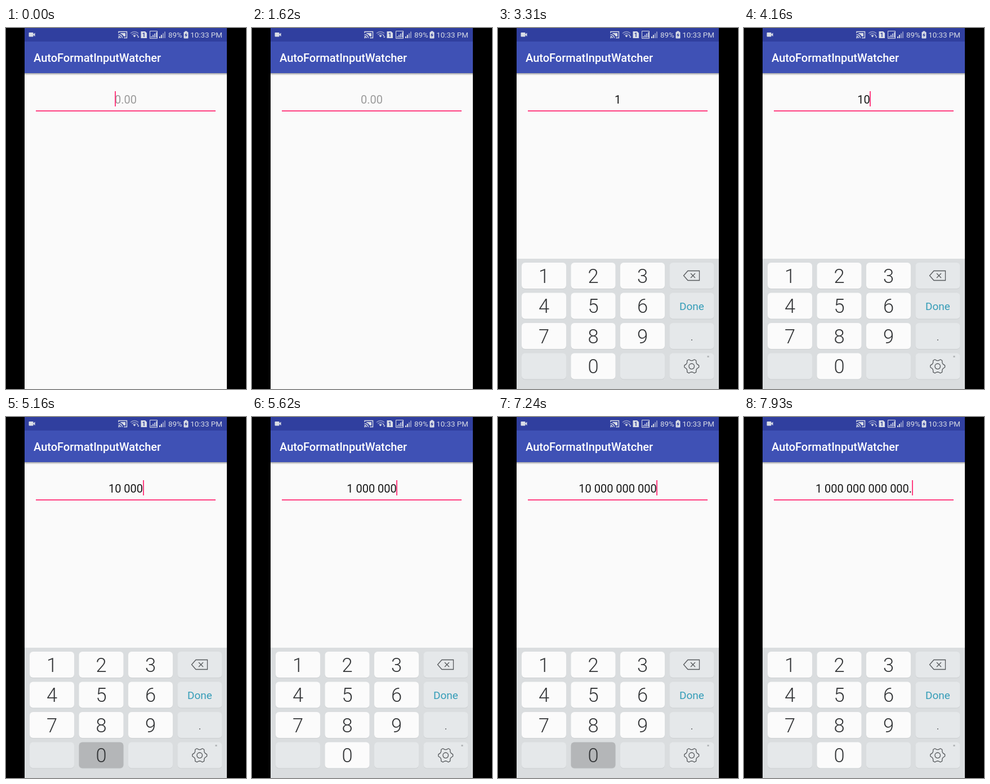
These frames come from a looping animation (426 by 640 pixels, 8 s). An HTML page with a canvas:

```html
<!DOCTYPE html>
<html lang="en">
<head>
<meta charset="utf-8">
<title>AutoFormatInputWatcher</title>
<style>
  html, body { margin: 0; width: 100%; height: 100%; overflow: hidden; background: #000; }
  canvas { display: block; }
</style>
</head>
<body>
<canvas id="stage" width="426" height="640"></canvas>
<script>
const ctx = document.getElementById('stage').getContext('2d');
const LOOP = 8000;
const LEFT = 33, WIDTH = 359, CENTER = 212.5;
const LABELS = ['1', '2', '3', 'back', '4', '5', '6', 'Done', '7', '8', '9', '.', '', '0', '', 'gear'];
const COLOR = {
  page: '#fafafa', bar: '#3f51b5', status: '#303f9f', icon: '#d9dde6', accent: '#ff4081',
  board: '#dadddf', key: '#fbfbfb', side: '#e5e8ea', pressed: '#b4b6b8', ink: '#333537', line: '#56595c'
};

// key, pressed, character shown, released (ms); zeros come in groups of three
const STROKES = [
  ['1', 3080, 3230, 3310],
  ['0', 3770, 3930, 4000],
  ['0', 4240, 4310, 4310],
  ['0', 4390, 4470, 4540],
  ['0', 5010, 5080, 5240],
  ['0', 5310, 5390, 5390],
  ['0', 5460, 5540, 5620],
  ['0', 6010, 6080, 6160],
  ['0', 6240, 6310, 6310],
  ['0', 6390, 6470, 6550],
  ['0', 6930, 7080, 7160],
  ['0', 7240, 7310, 7390],
  ['0', 7470, 7540, 7620],
  ['.', 7700, 7930, 7930]
];
const CURSOR_ON = [[0, 690], [1310, 1620], [3930, 4850], [5010, LOOP]];
const SLIDE = { start: 2000, step: 77, count: 4, height: 231 };

function rect(x, y, w, h, color) {
  ctx.fillStyle = color;
  ctx.fillRect(x, y, w, h);
}

function text(str, x, y, size, color, weight = 400, align = 'left') {
  ctx.font = `${weight} ${size}px Roboto, sans-serif`;
  ctx.textAlign = align;
  ctx.fillStyle = color;
  ctx.fillText(str, x, y);
}

function path(d, color, lineWidth) {
  const shape = new Path2D(d);
  if (lineWidth) {
    ctx.strokeStyle = color;
    ctx.lineWidth = lineWidth;
    ctx.stroke(shape);
  } else {
    ctx.fillStyle = color;
    ctx.fill(shape);
  }
}

function roundRect(x, y, w, h, r, color) {
  ctx.beginPath();
  ctx.roundRect(x, y, w, h, r);
  ctx.fillStyle = color;
  ctx.fill();
}

function signalBars(x, bottom, step, count, color) {
  for (let i = 0; i < count; i++) {
    const h = (i + 1) * step;
    rect(x + i * 3, bottom - h, 2, h, color);
  }
}

function statusBar() {
  const c = COLOR.icon;
  rect(LEFT, 0, WIDTH, 24, COLOR.status);
  roundRect(40.5, 8, 8, 7.5, 1, c);
  path('M48 11.5L51.5 8.5V15L48 12Z', c);

  path('M200 9V6.5H214.5V17.5H209', c, 1.4);
  path('M203 9H212V15H209Q207 11 203 10Z', c);
  path('M199.5 11.5Q206 12 206.5 18M199.5 14.5Q203 15 203.5 18', c, 1.3);
  rect(199.3, 16.2, 2, 2, c);

  path('M221 9.5Q228 3.5 235 9.5M223.3 12Q228 8 232.7 12', '#8f98c8', 1.6);
  path('M225.5 13.5Q228 11.5 230.5 13.5L228 16.5Z', c);
  path('M232 14L233.5 11.5L235 14ZM233 15H236.5L234.8 17.5Z', c);

  path('M239.5 6H247L250 9V18H239.5Z', c);
  text('1', 244.7, 15.8, 10, COLOR.status, 700, 'center');

  path('M255.5 5.5H268.5V18.5H255.5Z', c, 1);
  signalBars(257, 17, 2.4, 4, '#b4bbdc');
  signalBars(272, 18, 2.9, 4, '#8891c5');
  signalBars(272, 18, 2.9, 2, c);

  text('89%', 288, 17, 13.4, c);
  roundRect(315.5, 7, 8, 11.5, 1, c);
  rect(317.5, 5.5, 4, 2, c);
  path('M320.5 8L317 13.2H319.2L318.5 17L322 11.8H319.8Z', COLOR.status);
  text('10:33 PM', 384, 17, 13.4, c, 400, 'right');
}

function appBar() {
  const shadow = ctx.createLinearGradient(0, 80, 0, 84);
  shadow.addColorStop(0, 'rgba(60,60,60,.45)');
  shadow.addColorStop(1, 'rgba(60,60,60,0)');
  rect(LEFT, 80, WIDTH, 4, shadow);
  rect(LEFT, 24, WIDTH, 56, COLOR.bar);
  text('AutoFormatInputWatcher', 49, 60, 20, '#fff', 500);
}

function typedAt(t) {
  const raw = STROKES.filter(s => t >= s[2]).map(s => s[0]).join('');
  return raw.replace(/\B(?=(\d{3})+(?!\d))/g, ' ');
}

function inputField(t) {
  const typed = typedAt(t);
  text(typed || '0.00', CENTER, 134, 20, typed ? '#151515' : '#9a9a9a', 400, 'center');
  const half = ctx.measureText(typed || '0.00').width / 2;
  rect(53, 146, 319, 2, COLOR.accent);
  if (CURSOR_ON.some(([from, to]) => t >= from && t < to)) {
    const edge = typed ? CENTER + half : CENTER - half;
    rect(Math.round(edge - 0.5), 112, 2, 27, COLOR.accent);
  }
}

function gear(cx, cy) {
  ctx.beginPath();
  for (let i = 0; i < 24; i++) {
    const angle = (i - 0.5) * Math.PI / 12;
    const r = i % 4 < 2 ? 13 : 10.3;
    ctx.lineTo(cx + r * Math.cos(angle), cy + r * Math.sin(angle));
  }
  ctx.closePath();
  ctx.moveTo(cx + 4.8, cy);
  ctx.arc(cx, cy, 4.8, 0, 2 * Math.PI);
  ctx.strokeStyle = COLOR.line;
  ctx.lineJoin = 'round';
  ctx.lineWidth = 1.3;
  ctx.stroke();
}

function keyFace(label, cx, y) {
  if (label === 'back') {
    path('M329.5 439L337 430.5H357.5V447.5H337ZM342 435L350 443M350 435L342 443', COLOR.line, 1.3);
  } else if (label === 'gear') {
    gear(343.7, 599.8);
    rect(371.5, 581, 3, 3, '#b2b5b7');
  } else if (label === 'Done') {
    text(label, cx, y + 30, 19, '#359db8', 400, 'center');
  } else if (label === '.') {
    text(label, cx, y + 31, 24, COLOR.line, 300, 'center');
  } else {
    text(label, cx, y + 35.5, 34.5, COLOR.ink, 300, 'center');
  }
}

function keyboard(t) {
  if (t < SLIDE.start) return;
  const steps = 1 + Math.floor((t - SLIDE.start) / SLIDE.step);
  const progress = Math.min(1, steps / SLIDE.count);
  ctx.save();
  ctx.translate(0, SLIDE.height * (1 - progress) ** 2);
  rect(LEFT, 409, WIDTH, SLIDE.height, COLOR.board);
  const held = STROKES.find(s => t >= s[1] && t < s[3]);
  LABELS.forEach((label, i) => {
    const x = 42 + (i % 4) * 87.5;
    const y = 416 + Math.floor(i / 4) * 53.5;
    const isDigit = /\d/.test(label);
    const color = held && held[0] === label ? COLOR.pressed : isDigit ? COLOR.key : COLOR.side;
    roundRect(x, y + 1, 79, 46, 6, '#cccfd1');
    roundRect(x, y, 79, 46, 6, color);
    keyFace(label, x + 39.5, y);
  });
  ctx.restore();
}

function draw(now) {
  const t = now % LOOP;
  rect(0, 0, 426, 640, '#000');
  rect(LEFT, 0, WIDTH, 640, COLOR.page);
  statusBar();
  appBar();
  inputField(t);
  keyboard(t);
}

let start;
function tick(now) {
  start ??= now;
  draw(now - start);
  requestAnimationFrame(tick);
}
requestAnimationFrame(tick);
</script>
</body>
</html>
```
